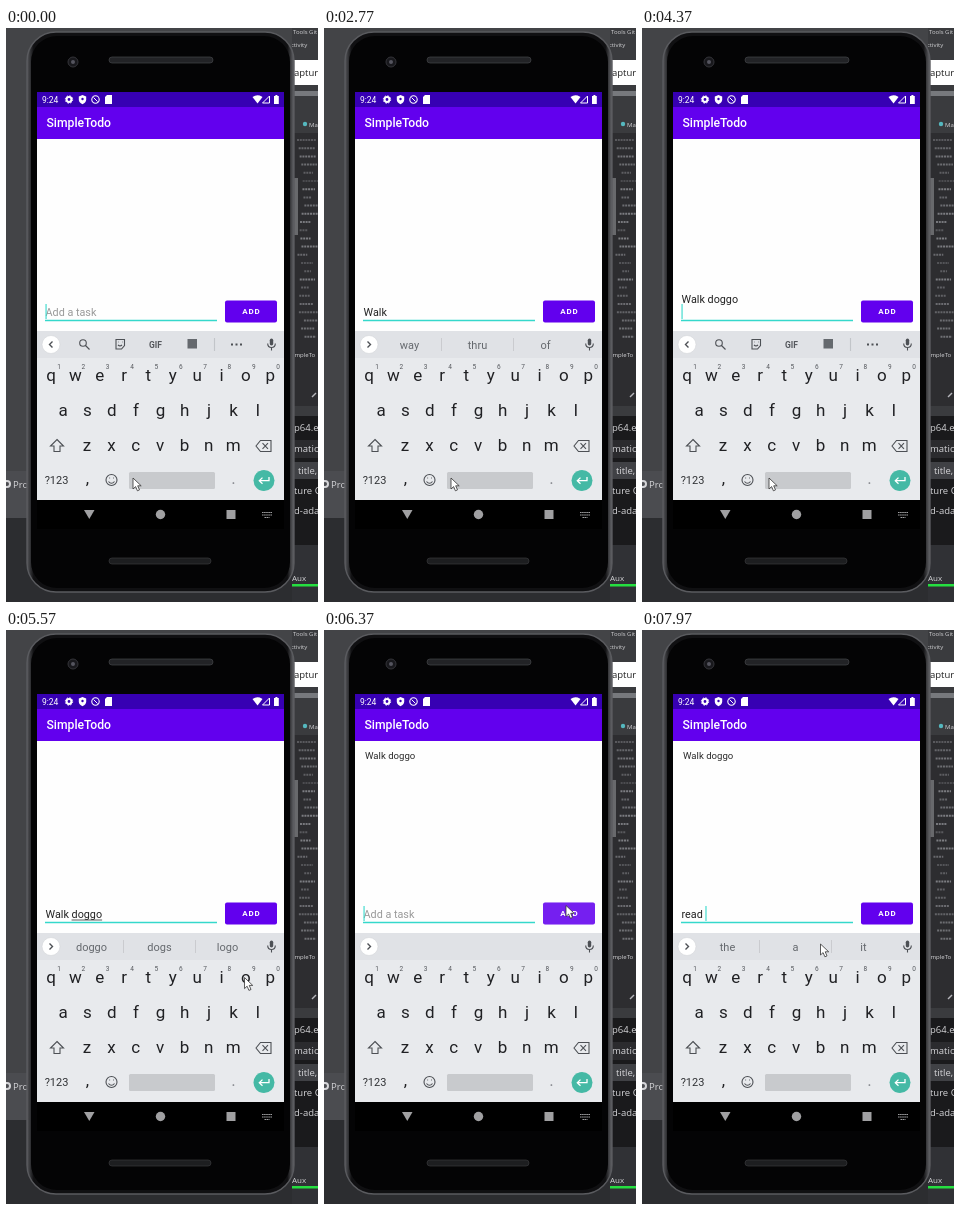
Write an HTML page that moves like this. It is 312 by 574 pixels and loops after 8 s.

```html
<!DOCTYPE html>
<html lang="en">
<head>
<meta charset="utf-8">
<title>Todo app demo</title>
<style>
  html, body { margin: 0; width: 100%; height: 100%; overflow: hidden; background: #3c3d40; }
  svg { display: block; width: 100vw; height: 100vh; }
  text { font-family: Roboto, sans-serif; white-space: pre; }
  .mid { text-anchor: middle; }
  .line { fill: none; stroke: #4d5055; stroke-width: 1.1; }
  .key { font-size: 17px; fill: #202124; }
  .digit { font-size: 6.5px; fill: #55585d; }
  .word { font-size: 11px; fill: #65696e; }
  .entry { font-size: 10.8px; fill: #222; }
  .side { font-family: "Open Sans", sans-serif; font-size: 9.5px; fill: #d5d5d8; }
  .small { font-size: 6px; }
</style>
</head>
<body>
<svg viewBox="0 0 312 574" preserveAspectRatio="none">
  <defs>
    <linearGradient id="rim" x2="1">
      <stop offset="0" stop-color="#55565a"/><stop offset=".025" stop-color="#101012"/>
      <stop offset=".975" stop-color="#101012"/><stop offset="1" stop-color="#66676b"/>
    </linearGradient>
    <clipPath id="panelClip"><rect x="286" width="26" height="574"/></clipPath>
  </defs>

  <!-- Desktop behind the phone -->
  <rect width="312" height="574" fill="#434447"/>
  <rect y="443" width="60" height="47" fill="#4b4c50"/>
  <rect y="490" width="312" height="84" fill="#2c2d30"/>
  <circle cx="1" cy="456" r="3" fill="none" stroke="#d5d5d8" stroke-width="2"/>
  <text class="side" x="7" y="460">Pro</text>
  <g clip-path="url(#panelClip)">
    <rect x="286" width="26" height="105" fill="#3a3b3e"/>
    <rect x="286" y="105" width="26" height="275" fill="#2d2d30"/>
    <rect x="286" y="380" width="26" height="194" fill="#1a1a1c"/>
    <g id="codeLines"></g>
    <text class="side small" x="287" y="6">Tools Git</text>
    <text class="side small" x="285" y="19">ctivity</text>
    <rect x="286" y="32" width="26" height="25" fill="#fff"/>
    <text class="side" x="288" y="48" style="fill:#222">aptur</text>
    <rect x="288" y="63" width="24" height="5" fill="#77797d"/>
    <circle cx="299" cy="96" r="2.2" fill="#55b8bf"/>
    <text class="side small" x="303" y="99">Ma</text>
    <rect x="288" y="150" width="4" height="57" fill="#68696c"/>
    <text class="side small" x="287" y="329">impleTo</text>
    <path d="M306 369l4-4" stroke="#b5b5ba" stroke-width="1.5"/>
    <rect x="286" y="378" width="26" height="10" fill="#3a3b3e"/>
    <rect x="286" y="412" width="26" height="18" fill="#2b2b2e"/>
    <rect x="286" y="434" width="26" height="17" fill="#404145"/>
    <text class="side" x="288" y="403">p64.exe</text>
    <text class="side" x="288" y="424">matic</text>
    <text class="side" x="292" y="446">title,</text>
    <text class="side" x="288" y="466">ture C</text>
    <text class="side" x="288" y="486">d-adap</text>
    <rect x="286" y="517" width="26" height="57" fill="#303135"/>
    <text class="side" x="286" y="553" style="font-size:8px">Aux</text>
    <rect x="286" y="556" width="26" height="2.5" fill="#25df40"/>
  </g>

  <!-- Phone body -->
  <rect x="21" y="4" width="267" height="560" rx="29" fill="url(#rim)" stroke="#5a5b5f" stroke-width="1.4"/>
  <rect x="25" y="8" width="259" height="552" rx="26" fill="#040405"/>
  <rect x="103" y="29" width="104" height="6" rx="3" fill="#222326" stroke="#444549" stroke-width=".7"/>
  <rect x="103" y="530" width="102" height="6" rx="3" fill="#1d1e20" stroke="#38393c" stroke-width=".7"/>
  <circle cx="67" cy="34" r="5" fill="#18181c" stroke="#343439"/>
  <circle cx="67" cy="34" r="2" fill="#55555f"/>
  <rect x="31" y="64" width="247" height="437" fill="#000"/>

  <!-- App -->
  <rect x="31" y="64" width="247" height="16" fill="#3700b3"/>
  <rect x="31" y="79" width="247" height="32" fill="#6200ee"/>
  <rect x="31" y="111" width="247" height="193" fill="#fefefe"/>
  <g fill="#fff">
    <text x="36" y="74.5" font-size="8.5">9:24</text>
    <circle cx="63" cy="71.5" r="2.4" fill="none" stroke="#fff" stroke-width="2"/>
    <circle cx="63" cy="71.5" r="3.7" fill="none" stroke="#fff" stroke-dasharray="1.5 1.4"/>
    <path d="M76.5 67l3.7 1.4v3q0 3-3.7 4.8q-3.7-1.8-3.7-4.8v-3z"/>
    <circle cx="76.5" cy="71" r="1.2" fill="#3700b3"/>
    <circle cx="89.5" cy="71.5" r="3.7" fill="none" stroke="#fff" stroke-width="1.1"/>
    <path d="M87.5 69.5l4 4" stroke="#fff"/>
    <path d="M101 67h5v9h-7v-7z"/>
    <path d="M246.5 69q5-3.6 10 0l-5 6.5z"/>
    <path d="M263.5 68v7h-7z" fill="none" stroke="#fff"/>
    <path d="M268 68h1.4v-1h2v1h1.4v8h-4.8z"/>
    <text x="40.5" y="99" font-size="12.2" font-weight="500">SimpleTodo</text>
  </g>
  <text id="todo" x="41" y="129" font-size="9.6" fill="#2a2a2a">Walk doggo</text>
  <path d="M39 292.5h172" stroke="#35d8cb" stroke-width="1.3"/>
  <text id="hint" class="entry" x="39.5" y="288" style="fill:#999">Add a task</text>
  <text id="firstLine" class="entry" x="39.5" y="275"></text>
  <text id="entry" class="entry" x="39.5" y="288"></text>
  <path id="composing" stroke="#333" stroke-width=".8"/>
  <rect id="caret" y="276" width="1.1" height="15" fill="#35d8cb"/>
  <rect x="219" y="272.5" width="52" height="22" rx="2" fill="#6200ee"/>
  <rect id="ripple" x="219" y="272.5" width="52" height="22" rx="2" fill="#fff"/>
  <text class="mid" x="245.4" y="286.2" font-size="8" font-weight="700" letter-spacing=".8" fill="#fff">ADD</text>

  <!-- Keyboard -->
  <rect x="31" y="303" width="247" height="169" fill="#e8eaed"/>
  <rect x="31" y="303" width="247" height="27" fill="#e0e2e6"/>
  <circle cx="45" cy="316.5" r="9" fill="#fff" stroke="#d5d7da" stroke-width=".6"/>
  <path id="chevron" class="line" style="stroke-width:1.4"/>
  <g id="tools" class="line">
    <circle cx="77" cy="315" r="3.3"/><path d="M79.5 317.5l4 4"/>
    <path d="M110 311.5h8.5v6l-3 3.5h-5.5zM112 317q2 2 4 0M112.5 314h.5M116 314h.5"/>
    <text class="mid" x="149.5" y="319.5" font-size="8.5" font-weight="700" style="fill:#55585d;stroke:none">GIF</text>
    <rect x="181.5" y="311" width="9.5" height="9.5" style="fill:#65696e;stroke:none"/>
    <path d="M208.5 310v13" stroke-opacity=".2"/>
    <path d="M225 316.5h2M229.5 316.5h2M234 316.5h2" stroke-width="2"/>
  </g>
  <g id="suggestions">
    <path d="M117.5 310v13M189.5 310v13" stroke="#c4c6ca" stroke-width=".8"/>
    <text class="word mid" x="85.5" y="320.5"></text>
    <text class="word mid" x="153.5" y="320.5"></text>
    <text class="word mid" x="221.5" y="320.5"></text>
  </g>
  <rect x="263.8" y="310.5" width="3.4" height="7" rx="1.7" fill="#4d5055"/>
  <path class="line" d="M261.7 315.5q0 4 3.8 4q3.8 0 3.8-4M265.5 319.5v3"/>
  <g id="keys"></g>
  <path class="line" d="M51 411.5l6.5 6.5h-3.5v5.5h-6v-5.5h-3.5z"/>
  <path class="line" d="M250 418l4.5-5.5h10.5v11h-10.5zM256.5 415.2l5.5 5.6M262 415.2l-5.5 5.6"/>
  <text class="mid" x="50.5" y="456" font-size="11" fill="#303235">?123</text>
  <text class="key mid" x="81.5" y="456">,</text>
  <text class="key mid" x="227.5" y="456" style="fill:#85888d">.</text>
  <g class="line"><circle cx="105.5" cy="452" r="5.5"/><path d="M102.5 453.5q3 3.5 6 0M103.3 450h.8M107 450h.8"/></g>
  <rect x="123" y="444" width="86" height="17" rx="1.5" fill="#c8cacd"/>
  <circle cx="258" cy="452.5" r="10.5" fill="#45b9a5"/>
  <path d="M263 449v3.7h-9M256.5 449.6l-3.2 3.1l3.2 3.1" fill="none" stroke="#fff" stroke-width="1.3"/>

  <!-- Navigation bar -->
  <g fill="#a0a0a2">
    <path d="M78 482h10.5l-5.2 9z"/><circle cx="154.5" cy="486.5" r="4.7"/><rect x="220.5" y="482" width="9" height="9"/>
    <path d="M256 484.5h10M256 487h10M258.5 489.5h5" stroke="#a0a0a2" stroke-width="1.2" stroke-dasharray="1.6 .5"/>
  </g>
  <path id="pointer" d="M0 0v11l2.6-2.4l1.8 4.2l2.1-.9l-1.8-4.1h3.5z" fill="#fff" stroke="#333" stroke-width=".8"/>
</svg>
<script>
const LOOP = 8000;
const $ = id => document.getElementById(id);
const words = [...document.querySelectorAll('.word')];
const show = (id, visible) => { $(id).style.display = visible ? '' : 'none'; };

// [time, entry text, suggestion words | "tools" | none]
const edits = [
  [0, '', 'tools'],
  [1170, 'W', ['W', 'We', 'What']],
  [1430, 'Wa', ['Wa', 'Walk', 'Was']],
  [1760, 'Wal', ['Wal', 'Walk', 'Wall']],
  [1930, 'Walk', ['Walk', 'Walked', 'Walking']],
  [2200, 'Walk ', ['way', 'thru', 'of']],
  [2830, 'Walk d', ['d', 'do', 'down']],
  [2990, 'Walk do', ['do', 'dog', 'down']],
  [3150, 'Walk dog', ['dog', 'dogs', 'dig']],
  [3330, 'Walk dogg', ['dogg', 'doggy', 'dogs']],
  [3500, 'Walk doggo', ['doggo', 'dogs', 'logo']],
  [4050, 'Walk doggo\n', 'tools'],
  [4930, 'Walk doggo', ['doggo', 'dogs', 'logo']],
  [6250, '', null],
  [6500, '', 'tools'],
  [7080, 'r', ['r', 're', 'are']],
  [7230, 're', ['re', 'are', 'we']],
  [7370, 'rea', ['rea', 'read', 'real']],
  [7520, 'read', ['read', 'ready', 'reading']],
  [7740, 'read ', ['the', 'a', 'it']]
];
const PRESS_TIME = 6130, ADD_TIME = 6250;

// [time, x, y]
const pointerPath = [
  [5100, 127, 450], [5560, 238.5, 348], [5810, 242, 275.5],
  [6600, 242, 275.5], [7000, 178.5, 314]
];

function buildKeys() {
  const rows = [['qwertyuiop', 45, 353], ['asdfghjkl', 57, 388], ['zxcvbnm', 81, 423]];
  $('keys').innerHTML = rows.map(([letters, left, y], row) =>
    [...letters].map((letter, i) => {
      const x = left + i * 24.35;
      const digit = row ? '' : `<text class="digit mid" x="${x + 8}" y="341">${(i + 1) % 10}</text>`;
      return `<text class="key mid" x="${x}" y="${y}">${letter}</text>${digit}`;
    }).join('')).join('');
}

function buildCodeLines() {
  let seed = 7, marks = '';
  const random = () => (seed = seed * 16807 % 2147483647) / 2147483647;
  for (let y = 112; y < 312; y += 8.2) {
    const x = 291 + random() * 8;
    marks += `<path d="M${x} ${y}h${6 + random() * 14}" stroke="#8a8b90" stroke-width="2" stroke-dasharray="2 .8" opacity="${.3 + random() * .6}"/>`;
  }
  $('codeLines').innerHTML = marks;
}

function pointerAt(time) {
  const next = pointerPath.findIndex(point => point[0] > time);
  if (next === 0) return pointerPath[0].slice(1);
  if (next < 0) return pointerPath.at(-1).slice(1);
  const [t0, x0, y0] = pointerPath[next - 1], [t1, x1, y1] = pointerPath[next];
  const p = (time - t0) / (t1 - t0), eased = p * p * (3 - 2 * p);
  return [x0 + (x1 - x0) * eased, y0 + (y1 - y0) * eased];
}

let shownEdit;
function applyEdit(edit) {
  const [, text, strip] = edit;
  const lines = text.split('\n'), last = lines.at(-1);
  $('firstLine').textContent = lines.length > 1 ? lines[0] : '';
  $('entry').textContent = last;
  show('hint', !text);

  const left = 39.5;
  const widthTo = end => end ? $('entry').getSubStringLength(0, end) : 0;
  const end = left + widthTo(last.length);
  const wordStart = left + widthTo(last.lastIndexOf(' ') + 1);
  $('caret').setAttribute('x', end);
  $('composing').setAttribute('d', end > wordStart ? `M${wordStart} 290H${end}` : '');

  const isTools = strip === 'tools';
  show('tools', isTools);
  show('suggestions', Array.isArray(strip));
  $('chevron').setAttribute('d', isTools ? 'M46.5 313.5l-3 3l3 3' : 'M43.5 313.5l3 3l-3 3');
  words.forEach((word, i) => {
    word.textContent = Array.isArray(strip) ? strip[i] : '';
    const isCorrection = i === 1 && strip && strip[1] === 'Walk';
    word.style.fontWeight = isCorrection ? 700 : 400;
    word.style.fill = isCorrection ? '#202124' : '';
  });
  shownEdit = edit;
}

function render(time) {
  const edit = edits.findLast(([start]) => start <= time);
  if (edit !== shownEdit) applyEdit(edit);
  // The caret restarts its blink at every change of the text.
  const [typedAt] = edits.find(([, text], i) => text === edit[1] && edits.indexOf(edit) - i < 2);
  show('caret', (time - typedAt) % 1000 < 500);
  show('todo', time >= ADD_TIME);
  const pressed = time - PRESS_TIME;
  $('ripple').setAttribute('opacity', pressed < 0 ? 0 : .2 * Math.max(0, 1 - pressed / 600));
  $('pointer').setAttribute('transform', `translate(${pointerAt(time)})`);
}

buildKeys();
buildCodeLines();
const startTime = performance.now();
function tick() {
  render((performance.now() - startTime) % LOOP);
  requestAnimationFrame(tick);
}
tick();
</script>
</body>
</html>
```
